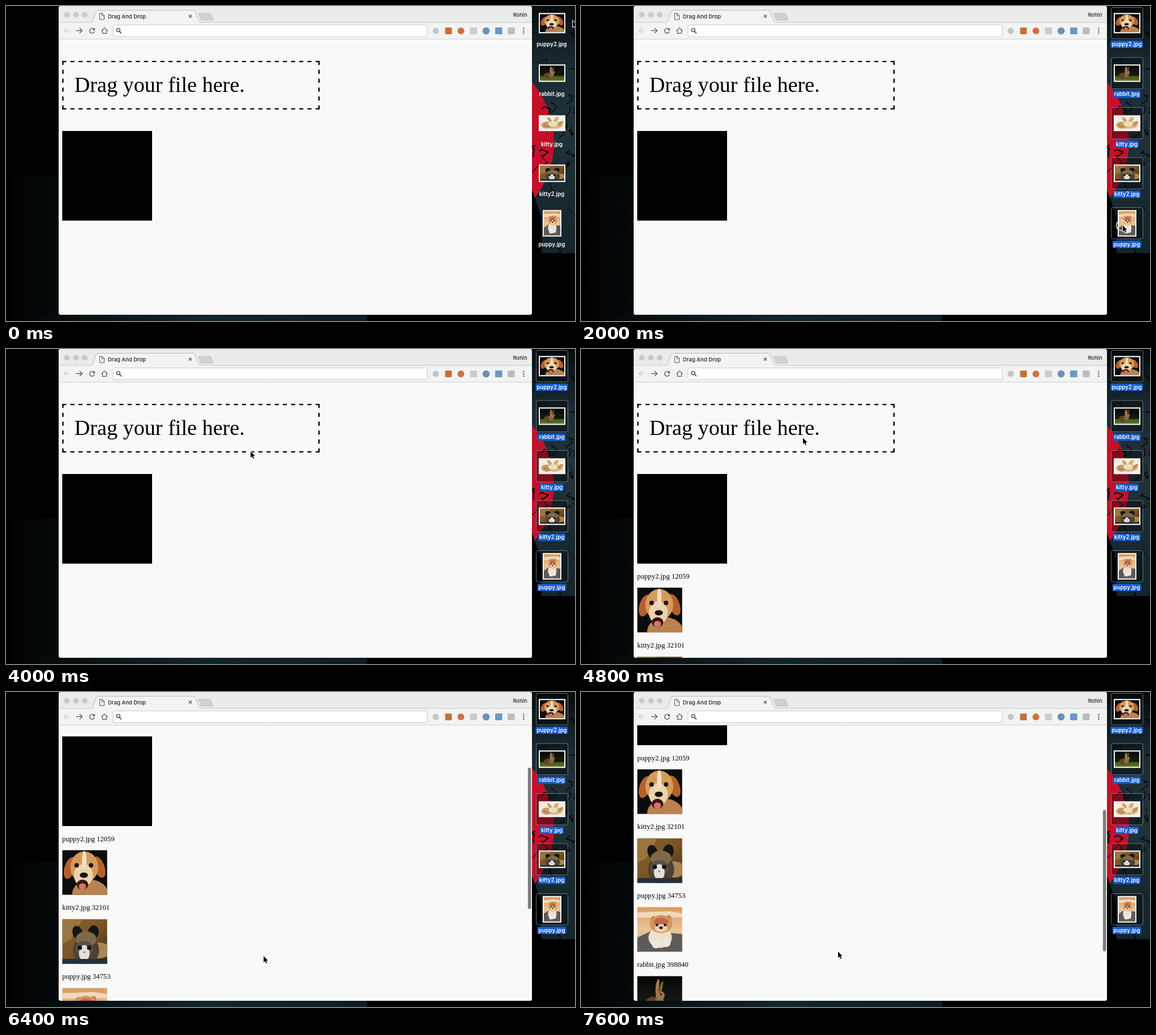
Animation, 1005 px wide and 557 px high, one loop 8 s. Source, as an HTML page with a canvas:

```html
<!DOCTYPE html>
<html lang="en">
<head>
<meta charset="utf-8">
<title>Drag And Drop</title>
<style>
html, body { margin: 0; width: 100%; height: 100%; overflow: hidden; background: #000; }
canvas { display: block; }
</style>
</head>
<body>
<canvas id="stage" width="1005" height="557"></canvas>
<script>
const c = document.getElementById('stage').getContext('2d');
const UI = 'Inter, "Open Sans", sans-serif';
const SERIF = '"Liberation Serif", "Noto Serif", serif';
const STEP = 400, STEPS = 20;

// Pointer tip at each step
const POINTER = [
  [1001, 26], [975, 80], [949, 432], [950, 415], [957, 388],
  [957, 388], [847, 348], [661, 271], [432, 180], [432, 181],
  [432, 181], [410, 168], [392, 157], [440, 420], [455, 467],
  [455, 467], [455, 467], [455, 465], [454, 462], [454, 459]
];
const SCROLL = { 15: 70, 16: 142.5, 17: 190, 18: 240, 19: 285.5 };

// ---- drawing helpers ----
function rect(color, x, y, w, h, r = 0) {
  c.fillStyle = color;
  c.beginPath();
  c.roundRect(x, y, w, h, r);
  c.fill();
}
function frame(color, x, y, w, h, r = 0, width = 1) {
  c.strokeStyle = color;
  c.lineWidth = width;
  c.beginPath();
  c.roundRect(x, y, w, h, r);
  c.stroke();
}
function oval(color, x, y, rx, ry = rx, turn = 0) {
  c.fillStyle = color;
  c.beginPath();
  c.ellipse(x, y, rx, ry, turn, 0, 7);
  c.fill();
}
function path(points, close) {
  c.beginPath();
  points.forEach(([x, y]) => c.lineTo(x, y));
  if (close) c.closePath();
}
function poly(color, ...points) {
  c.fillStyle = color;
  path(points, true);
  c.fill();
}
function line(color, width, ...points) {
  c.strokeStyle = color;
  c.lineWidth = width;
  path(points);
  c.stroke();
}
function text(str, x, y, font, color, align = 'left') {
  c.font = font;
  c.fillStyle = color;
  c.textAlign = align;
  c.fillText(str, x, y);
}
function fade(x0, y0, x1, y1, ...colors) {
  const g = c.createLinearGradient(x0, y0, x1, y1);
  colors.forEach((col, i) => g.addColorStop(i / (colors.length - 1), col));
  return g;
}
function random(seed) {
  return () => (seed = seed * 16807 % 2147483647) / 2147483647;
}

// ---- pictures, in a 100 x 100 space ----
const PICTURES = {
  puppy2() {
    rect('#0b0c0d', 0, 0, 100, 100);
    oval('#b98250', 62, 98, 40, 32);
    oval('#b5602c', 17, 40, 12, 25, .3);
    oval('#b5602c', 82, 38, 12, 25, -.35);
    oval('#d49a5c', 49, 38, 31, 35);
    oval('#ecd3ae', 47, 56, 21, 25);
    oval('#f0dfc4', 49, 22, 5, 20);
    oval('#3b1513', 45, 77, 13, 11);
    oval('#d4766c', 45, 81, 8, 7);
    oval('#17110f', 48, 56, 9, 6);
    oval('#21150f', 32, 34, 5);
    oval('#21150f', 64, 34, 5);
  },
  rabbit() {
    rect(fade(0, 0, 0, 100, '#060707', '#15180f', '#15180f'), 0, 0, 100, 100);
    rect(fade(0, 66, 0, 100, '#3c5418', '#5f7a22'), 0, 68, 100, 32);
    oval('#5f4429', 36, 66, 20, 20);
    oval('#8a6742', 48, 60, 10, 20, .2);
    oval('#9a7850', 51, 43, 10, 10);
    oval('#a5794f', 45, 24, 4, 17, .12);
    oval('#82603c', 53, 26, 3, 15, .25);
    oval('#100c08', 53, 41, 2);
  },
  kitty() {
    rect('#f3ede2', 0, 0, 100, 100);
    oval('#d9b98a', 58, 62, 36, 28);
    oval('#c79a61', 28, 64, 22, 26);
    oval('#c99d67', 40, 25, 7, 20, -.4);
    oval('#d5ac76', 66, 25, 8, 22, .4);
    oval('#efdcbd', 54, 55, 20, 20);
    oval('#c59058', 84, 52, 8, 20, .5);
    oval('#5b3a22', 20, 66, 3);
    oval('#5b3a22', 34, 68, 3);
    oval('#b97262', 27, 78, 4, 3);
  },
  kitty2() {
    rect(fade(0, 0, 100, 100, '#83602f', '#7b5527', '#38281b'), 0, 0, 100, 100);
    poly('#9b7540', [0, 0], [45, 0], [20, 45], [0, 55]);
    oval('#a98655', 82, 70, 24, 18);
    oval('#4f4030', 53, 70, 29, 32);
    oval('#171512', 34, 31, 11, 16, -.3);
    oval('#171512', 69, 30, 12, 16, .2);
    oval('#7f6949', 53, 45, 23, 17);
    oval('#575049', 49, 66, 20, 17);
    oval('#e3e0da', 49, 76, 12, 18);
    oval('#141715', 39, 64, 5);
    oval('#141715', 60, 64, 5);
    oval('#b98078', 49, 74, 3, 2);
    rect('#25303a', 0, 89, 100, 11);
  },
  puppy() {
    rect(fade(0, 0, 0, 100, '#d99b5d', '#e9c499', '#d6a674'), 0, 0, 100, 100);
    poly('#f0d9ba', [0, 12], [70, 9], [100, 14], [100, 23], [0, 24]);
    poly('#5d5b5a', [0, 68], [30, 54], [100, 60], [100, 100], [0, 100]);
    oval('#efdfcd', 51, 68, 26, 23);
    oval('#eee8e0', 42, 82, 10, 10);
    oval('#eee8e0', 65, 80, 9, 9);
    oval('#c8814a', 36, 28, 6, 8);
    oval('#c8814a', 70, 26, 6, 8);
    oval('#d4945e', 53, 38, 25, 20);
    oval('#c1674c', 53, 33, 16, 9);
    oval('#eed0ae', 53, 47, 14, 9);
    oval('#211815', 44, 40, 3);
    oval('#211815', 62, 40, 3);
    oval('#211815', 53, 46, 4, 3);
  }
};
function picture(name, x, y, w, h) {
  c.save();
  c.beginPath();
  c.rect(x, y, w, h);
  c.clip();
  c.translate(x, y);
  c.scale(w / 100, h / 100);
  PICTURES[name]();
  c.restore();
}

// ---- desktop ----
const FILES = [['puppy2', 47, 36], ['rabbit', 47, 31], ['kitty', 47, 28], ['kitty2', 47, 31], ['puppy', 33, 47]];

function wallpaper() {
  rect('#000', 0, 0, 1005, 557);
  rect(fade(0, 0, 93, 0, '#000', '#04090b'), 0, 300, 93, 257);
  rect(fade(60, 0, 638, 0, '#04090b', '#12242c', '#0d1d25'), 60, 546, 578, 11);
  rect(fade(0, 0, 0, 437, '#070c0e', '#1b2b33', '#21323a', '#1a2a31', '#14242b'), 929, 0, 76, 437);
  c.save();
  c.beginPath();
  c.rect(929, 0, 76, 437);
  c.clip();
  oval('#c3112a', 807, 240, 161);
  const rnd = random(77);
  for (let i = 0; i < 34; i++) {
    let x = 929 + rnd() * 76, y = rnd() * 430;
    const pts = [[x, y]];
    for (let k = 0; k < 4; k++) pts.push([x += rnd() * 22 - 10, y += rnd() * 16 - 5]);
    line('#04070a', .7 + rnd() * 1.8, ...pts);
  }
  poly('#000', [929, 325], [936, 345], [945, 372], [946, 437], [929, 437]);
  c.restore();
}

function fileIcon(i, state) {
  const [name, w, h] = FILES[i], mid = 30.3 + i * 88.5, label = name + '.jpg';
  const boxed = state === 'marked' || state === 'chosen';
  if (boxed) {
    rect('rgba(0,0,0,.35)', 936.5, mid - 27.8, 56, 55.5, 3);
    frame('rgba(150,165,170,.65)', 936.5, mid - 27.8, 56, 55.5, 3);
  }
  rect('#f4f4f2', 964.5 - w / 2, mid - h / 2, w, h);
  picture(name, 966.5 - w / 2, mid - h / 2 + 2, w - 4, h - 4);
  c.font = `600 9.7px ${UI}`;
  if (state !== 'plain') {
    const tw = c.measureText(label).width + 4;
    rect(state === 'marked' ? '#c6c7c7' : '#1259c9', 964 - tw / 2, mid + 30.7, tw, 13, 2.5);
  }
  text(label, 964, mid + 40.6, c.font, state === 'marked' ? '#66696a' : '#fff', 'center');
}

// ---- browser ----
function browserBar() {
  rect('#eaecec', 93, 0, 836, 30, [4, 4, 0, 0]);
  rect('#f2f3f3', 93, 29, 836, 29.5);
  line('#c4c7c7', 1, [93, 29], [150, 29]);
  line('#c4c7c7', 1, [343, 29], [929, 29]);
  for (const x of [107.5, 123.5, 139]) oval('#c9cbcb', x, 15.5, 5);
  const tab = [[150, 29.5], [153, 27], [159, 10], [162, 7.5], [331, 7.5], [334, 10], [341, 27], [344, 29.5]];
  poly('#f2f3f3', ...tab);
  line('#b9bcbc', 1, ...tab);
  poly('#d0d2d2', [340, 13], [361, 13], [366, 25], [345, 25]);
  line('#b9bcbc', .8, [340, 13], [361, 13], [366, 25], [345, 25], [340, 13]);
  line('#555', 1, [165.5, 13], [170, 13], [173.5, 16.5], [173.5, 24], [165.5, 24], [165.5, 12.5]);
  line('#555', 1, [169.5, 13], [169.5, 17], [173.5, 17]);
  text('Drag And Drop', 180, 21.6, `500 9.5px ${UI}`, '#222');
  line('#555', 1.2, [323, 15.5], [328, 20.5]);
  line('#555', 1.2, [328, 15.5], [323, 20.5]);
  text('Rohin', 920.5, 19.2, `500 9.3px ${UI}`, '#222', 'right');

  line('#cbcdcd', 1.4, [112, 43.5], [103, 43.5]);
  line('#cbcdcd', 1.4, [107, 39], [102.5, 43.5], [107, 48]);
  line('#5a5a5a', 1.4, [124, 43.5], [134, 43.5]);
  line('#5a5a5a', 1.4, [130, 39], [134.5, 43.5], [130, 48]);
  c.strokeStyle = '#5a5a5a';
  c.lineWidth = 1.4;
  c.beginPath();
  c.arc(152, 43.8, 4.3, .3, 5.5);
  c.stroke();
  poly('#5a5a5a', [157, 38.5], [157, 43], [152.5, 43]);
  line('#5a5a5a', 1.2, [168.5, 44], [174, 38.8], [179.5, 44]);
  line('#5a5a5a', 1.2, [170.5, 43], [170.5, 48.3], [177.5, 48.3], [177.5, 43]);

  rect('#fff', 189, 33.5, 555, 20.5, 2.5);
  frame('#c9cbcb', 189, 33.5, 555, 20.5, 2.5);
  c.lineWidth = 1.4;
  c.strokeStyle = '#444';
  c.beginPath();
  c.arc(198.3, 42.6, 3, 0, 7);
  c.stroke();
  line('#444', 1.6, [200.5, 45], [204, 48.4]);

  oval('#c4c6c6', 759, 44, 5.5);
  rect('#c4713a', 775.5, 38, 12, 12, 2);
  oval('#d2713c', 803.5, 44, 6);
  rect('#cbcdcd', 819.5, 38, 12.5, 12, 1);
  oval('#6b8fbd', 848, 44, 6.3);
  rect('#6b96c6', 864, 38, 12.5, 12, 1);
  rect('#bcbebe', 886, 38, 12.5, 12, 2);
  for (const y of [39.7, 43.9, 48.1]) oval('#555', 914.3, y, 1.25);
  line('#d0d2d2', 1, [93, 58.5], [929, 58.5]);
}

function dashed(x0, y0, x1, y1, count) {
  const length = x1 - x0 + y1 - y0, dash = 7.2;
  c.setLineDash([dash, (length - count * dash) / (count - 1)]);
  line('#000', 2.4, [x0, y0], [x1, y1]);
}

function page(step) {
  const scroll = SCROLL[step] || 0;
  c.save();
  c.beginPath();
  c.roundRect(93, 59, 836, 487, [0, 0, 4, 4]);
  c.clip();
  rect('#f9f9f9', 93, 59, 836, 487);
  c.translate(0, -scroll);
  if (step === 8) rect('#c3c5c5', 99.5, 97, 454.5, 86);
  dashed(99.3, 98.1, 554, 98.1, 32);
  dashed(99.3, 181.9, 554, 181.9, 32);
  dashed(100.5, 97, 100.5, 183, 6);
  dashed(552.8, 97, 552.8, 183, 6);
  c.setLineDash([]);
  text('Drag your file here.', 120.7, 152, `38.2px ${SERIF}`, '#000');
  rect('#000', 99.3, 221, 158.7, 158.5);
  if (step >= 12) {
    [['puppy2', 12059], ['kitty2', 32101], ['puppy', 34753], ['rabbit', 398840]].forEach(([name, size], i) => {
      const y = 406 + i * 121.9;
      text(`${name}.jpg ${size}`, 99.3, y, `12.7px ${SERIF}`, '#000');
      picture(name, 99.3, y + 16, 79.5, 79.3);
    });
  }
  c.restore();
  if (scroll) rect('#7b7c7c', 921.8, 59 + scroll * .524, 5.6, 250, 2.8);
}

function pointer(x, y) {
  c.save();
  c.translate(x, y);
  c.lineJoin = 'round';
  path([[0, 0], [0, 11], [2.5, 8.7], [4.2, 12.7], [6.1, 11.9], [4.4, 8], [7.8, 8]], true);
  c.strokeStyle = '#fff';
  c.lineWidth = 1.8;
  c.stroke();
  c.fillStyle = '#000';
  c.fill();
  c.restore();
}

function draw(step) {
  const [x, y] = POINTER[step];
  wallpaper();
  rect('#f9f9f9', 93, 0, 836, 546, 4);
  page(step);
  browserBar();

  const selecting = step === 1 || step === 2;
  FILES.forEach((_, i) => {
    const reached = y > 2.5 + i * 88.5;
    fileIcon(i, step > 2 ? 'chosen' : selecting && reached ? 'marked' : 'plain');
  });
  if (selecting) {
    rect('rgba(255,255,255,.12)', x, 28, 1000 - x, y - 28);
    frame('rgba(255,255,255,.45)', x + .5, 28.5, 999 - x, y - 28);
  }
  if (step === 5) {
    c.strokeStyle = '#f3dfb4';
    c.lineWidth = 1.6;
    c.beginPath();
    c.arc(954.5, 388, 9, 0, 7);
    c.stroke();
  }
  const dragging = step >= 6 && step <= 8;
  if (dragging) {
    c.save();
    c.translate(x - 956, y - 387);
    c.globalAlpha = .94;
    FILES.forEach((_, i) => fileIcon(i, 'dragged'));
    c.restore();
    oval('#d8232b', x + 7, y + 16, 7.3);
    text('5', x + 7, y + 19.7, `500 10px ${UI}`, '#fff', 'center');
  }
  pointer(x, y);
}

function tick() {
  draw(Math.floor(performance.now() / STEP) % STEPS);
  requestAnimationFrame(tick);
}
tick();
</script>
</body>
</html>
```
